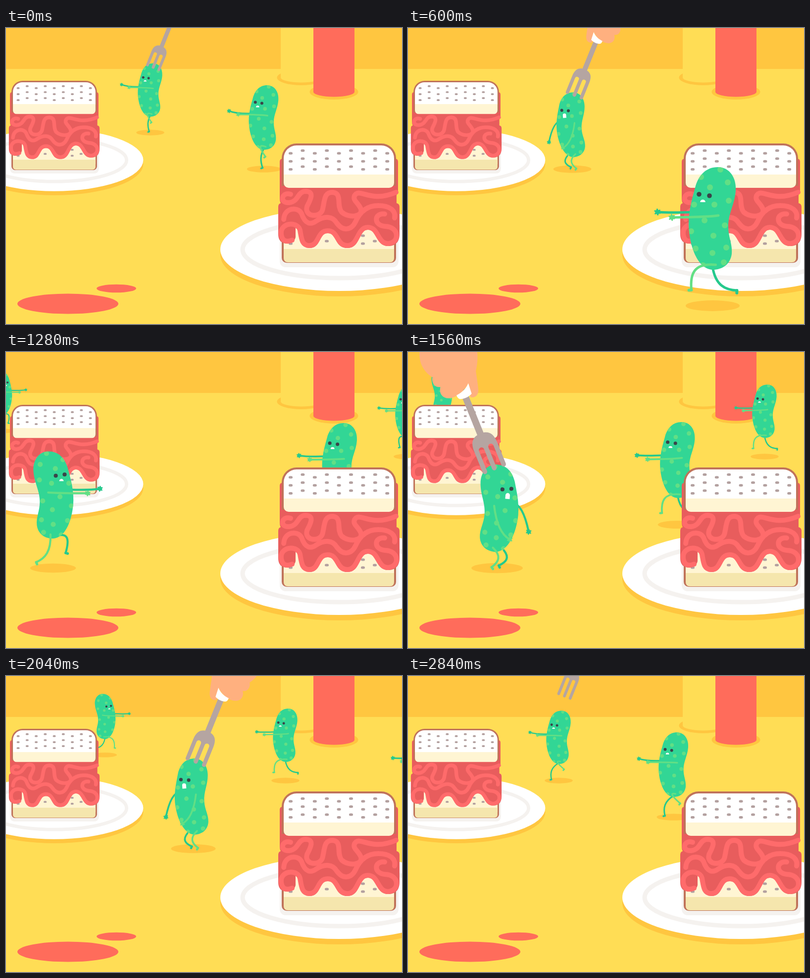
Write an HTML page with a canvas that moves like this. It is 800 by 600 pixels and loops after 2880 ms.

```html
<!DOCTYPE html>
<html lang="en">
<head>
<meta charset="utf-8">
<title>Pickle picnic</title>
<style>
html, body { margin: 0; width: 100%; height: 100%; overflow: hidden; background: #ffdd55; }
canvas { display: block; }
</style>
</head>
<body>
<canvas id="stage" width="800" height="600"></canvas>
<script>
const ctx = document.getElementById('stage').getContext('2d');
const LOOP = 2880, STEP = 40, CYCLE = 480, SPEED = 0.625;
const ORANGE = '#ffc640', TABLE = '#ffdd55', RED = '#ff6c5b', PLATE_GREY = '#f5f2ef';
const GREEN = '#32d695', DARK = '#25c98d', LIGHT = '#62df85';

const clamp = v => Math.max(0, Math.min(1, v));
const mix = (a, b, p) => a + (b - a) * p;
const mod = (a, n) => ((a % n) + n) % n;

function fill(path, color) { ctx.fillStyle = color; ctx.fill(path); }
function stroke(path, color, width) {
  ctx.strokeStyle = color;
  ctx.lineWidth = width;
  ctx.lineCap = ctx.lineJoin = 'round';
  ctx.stroke(path);
}
function ellipse(x, y, rx, ry, color) {
  const p = new Path2D();
  p.ellipse(x, y, rx, ry, 0, 0, 7);
  fill(p, color);
}
function rect(x, y, w, h, color, radii = 0) {
  const p = new Path2D();
  p.roundRect(x, y, w, h, radii);
  fill(p, color);
}
function group(draw) { ctx.save(); draw(); ctx.restore(); }

// ---------- table setting ----------
const meat = new Path2D('M553 271 Q553 265 559 265 H786 Q792 265 792 271 V331 Q789 335 789 340 ' +
  'V355 Q795 356 795 363 V418 C795 434 786 442 772 442 C746 442 751 409 731 409 ' +
  'C711 409 717 446 690 446 C662 446 670 416 650 416 C630 416 638 446 613 446 ' +
  'C592 446 597 405 585 402 V424 Q582 437 567 437 Q550 436 550 418 V363 Q550 356 555 355 Q553 352 553 345 Z');
const noodles = new Path2D(
  'M575 337 C556 331 552 356 572 354 C592 352 588 331 606 331 C626 332 612 353 608 362 ' +
  'C602 384 637 386 640 366 C644 347 643 333 660 333 C680 335 667 360 678 373 ' +
  'C692 386 722 383 717 367 C712 354 700 350 704 340 C714 322 735 356 788 333 ' +
  'M561 388 C563 363 590 362 597 376 C604 397 615 400 627 391 C645 380 660 382 668 395 ' +
  'C680 412 697 411 706 393 C715 372 730 360 752 360 C775 360 788 370 785 385 ' +
  'M578 430 C561 437 555 426 556 412 C560 393 590 393 594 410 C597 428 598 441 613 441 ' +
  'C633 441 628 411 650 411 C672 411 667 441 690 441 C712 441 709 404 731 404 ' +
  'C753 404 750 437 772 437 C796 435 795 403 766 402 C741 400 744 374 765 377');

function seed(x, y) { rect(x - 4, y - 2.5, 8, 5, '#b3a09f', 2.5); }

function sandwich() {
  ellipse(673, 460, 240, 84, ORANGE);
  ellipse(673, 449, 240, 84, '#fff');
  const ring = new Path2D();
  ring.ellipse(673, 449, 195, 58, 0, 0, 7);
  stroke(ring, PLATE_GREY, 9);
  rect(553, 400, 240, 85, PLATE_GREY, 12);

  rect(557, 380, 231, 96, '#c0735a', 10);
  rect(561, 380, 223, 80, '#fff5d3');
  rect(561, 448, 223, 27, '#f5e6ad', [0, 0, 8, 8]);
  for (const [x, y] of [[575, 437], [648, 432], [721, 421], [721, 437], [745, 432]]) seed(x, y);

  fill(meat, '#e85d5d');
  rect(557, 234, 231, 91, '#c0735a', [30, 30, 8, 8]);
  rect(556, 318, 233, 8, '#e85d5d');
  rect(557, 300, 231, 20, '#c0735a');
  rect(561, 238, 223, 60, '#fff', [26, 26, 0, 0]);
  rect(561, 297, 223, 27, '#fff5d3', [0, 0, 10, 10]);
  for (let col = 0; col < 9; col++)
    for (let row = 0; row < 3; row++)
      seed(575 + col * 24.4, (col % 2 ? 248.5 : 254) + row * 16.2);
  stroke(noodles, '#ff6b6b', 10);
}

function bottle(x, base, color) {
  ellipse(x, base, 49, 15.5, ORANGE);
  rect(x - 41.5, 0, 83, base, color);
  ellipse(x, base, 41.5, 10, color);
}

function table() {
  rect(0, 0, 800, 600, TABLE);
  rect(0, 0, 800, 83, ORANGE);
  bottle(596.5, 100.5, TABLE);
  bottle(662.5, 129.5, RED);
  ellipse(125, 559, 102, 20.5, RED);
  ellipse(223, 528, 40, 8.3, RED);
}

// ---------- pickles: unit scale, facing left, ground at y = 0 ----------
const body = new Path2D('M12 -208 C36 -208 50 -186 48 -160 C46 -132 33 -115 33 -88 ' +
  'C33 -65 42 -52 40 -32 C37 -10 20 0 2 0 C-30 -1 -46 -50 -47 -92 C-47 -125 -38 -150 -33 -170 C-26 -192 -12 -208 12 -208Z');
const spots = [[-22, -188], [17, -203], [32, -177], [-4, -167], [-36, -132], [5, -132], [34, -140], [-15, -100],
  [26, -90], [-42, -78], [3, -69], [-33, -43], [29, -45], [1, -34], [24, -15], [-18, -9]];

// Foot x, y and knee x, y at twelve even steps of the stride.
const stride = [[-4, -4, -16, -38], [21, -4, -2, -30], [40, -14, 4, -30], [49, -31, 8, -33],
  [38, -42, -6, -58], [21, -44, -20, -80], [5, -40, -26, -84], [-12, -38, -36, -88],
  [-30, -36, -46, -92], [-43, -32, -48, -88], [-46, -9, -46, -66], [-28, -4, -38, -46]];
const dangle = { dark: [-4, -6, -34, -20], light: [13, -2, -16, -24] };

function legPose(phase, rest, p) {
  const i = mod(phase, CYCLE) / 40, k = Math.floor(i);
  return stride[k].map((v, n) => mix(mix(v, stride[(k + 1) % 12][n], i - k), rest[n], p));
}

function leg(hx, hy, [fx, fy, kx, ky], color) {
  const cx = mix(fx, kx, 0.6), cy = mix(fy, ky, 0.6);
  const p = new Path2D();
  p.moveTo(hx, hy);
  p.bezierCurveTo(mix(hx, kx, 0.8), mix(hy, ky, 0.8), cx, cy, fx, fy);
  stroke(p, color, 5);
  const len = Math.hypot(fx - cx, fy - cy) || 1;
  const toe = new Path2D();
  toe.moveTo(fx, fy);
  toe.lineTo(fx - (fy - cy) / len * 5, fy + (fx - cx) / len * 5);
  stroke(toe, color, 6);
}

function arm(sx, sy, cx, cy, hx, hy, color) {
  const p = new Path2D();
  p.moveTo(sx, sy);
  p.quadraticCurveTo(cx, cy, hx, hy);
  stroke(p, color, 5);
  ellipse(hx, hy, 4.8, 4.8, color);
  const fingers = new Path2D();
  for (let a = 0.4; a < 6; a += Math.PI / 3) {
    fingers.moveTo(hx, hy);
    fingers.lineTo(hx + 5.6 * Math.cos(a), hy + 5.6 * Math.sin(a));
  }
  stroke(fingers, color, 3);
}

function pickle(phase, p, height) {
  const sway = 4 * Math.cos(4 * Math.PI * phase / CYCLE);
  const settle = clamp(p * 1.5);
  const darkHand = [mix(-110, -75, p * p), mix(-121 - sway, -48, 1 - (1 - p) ** 1.2)];
  const lightHand = [mix(-81, -30, p ** 1.5), mix(-110 - sway, -30, 1 - (1 - p) ** 2)];
  const shoulder = mix(13, 7, p);

  leg(mix(0, -16, settle), -height - 4, legPose(phase, dangle.dark, settle), DARK);
  group(() => {
    ctx.translate(mix(-1.5, 0, p), -height);
    arm(-36, -117, mix(-36, darkHand[0], 0.65), -115, ...darkHand, DARK);
    group(() => {
      ctx.translate(3.5 * settle, 0);
      ctx.rotate(-0.075 * settle);
      fill(body, GREEN);
      group(() => {
        ctx.clip(body);
        for (const [x, y] of spots) ellipse(x, y, 6, 6, LIGHT);
      });
      ellipse(-26, -153, 4.8, 4.8, '#3a4449');
      ellipse(-5, -150, 4.8, 4.8, '#3a4449');
      const mouth = new Path2D();
      mouth.arc(-18.5, -137, 5.3, Math.PI, 0);
      mouth.lineTo(-13.2, -137 + 9 * settle);
      mouth.lineTo(-23.8, -137 + 9 * settle);
      fill(mouth, '#fff');
    });
    arm(shoulder, -110, mix(shoulder, lightHand[0], 0.2), mix(-110, lightHand[1], 0.8), ...lightHand, LIGHT);
  });
  leg(mix(6, 10, settle), -height - 10, legPose(phase + CYCLE / 2, dangle.light, settle), LIGHT);
}

// ---------- fork and hand, authored around (390, 520) ----------
const fist = new Path2D('M590 -400 L470 -10 C437 12 438 55 445 85 C443 100 440 118 439 130 C439 145 449 150 458 147 ' +
  'L463 114 C474 134 490 148 508 150 C527 151 533 135 529 123 C544 126 551 110 548 100 ' +
  'C572 85 580 62 579 42 C578 22 572 8 562 -8 L690 -380Z');
const cuff = new Path2D('M463 114 L455 139 C462 147 473 152 483 152 Q488 151 491 143 C478 136 469 128 463 114Z');

function fork(tip) {
  group(() => {
    ctx.translate(9, -198);
    ctx.rotate(22 * Math.PI / 180);
    const tine = 'a5.5 5.5 0 0 1 -11 0';
    fill(new Path2D(`M-29.5 ${tip} V-60 C-29.5 -80 -23 -91 -8 -94 V-195 H8 V-94 C23 -91 29.5 -80 29.5 -60 ` +
      `V${tip} ${tine} V-57 A6.5 6.5 0 0 0 5.5 -57 V${tip} ${tine} V-57 A6.5 6.5 0 0 0 -18.5 -57 V${tip} ${tine}Z`), '#b5a5a1');
  });
  ctx.translate(-390, -520);
  fill(fist, '#ffb07f');
  fill(cuff, '#fff');
}

// ---------- one lane: walk in, get speared, get lifted away ----------
function lane(time, { x, y, s, caught, dir }) {
  const since = mod(time - caught + 2480, LOOP) - 2480;
  const phase = since < 0 ? mod(time, CYCLE) : 0;
  const p = clamp(since / 120);
  const walked = Math.min(since, 0) * SPEED;
  const height = since < 0
    ? 67.5 - 5.5 * Math.cos(4 * Math.PI * phase / CYCLE)
    : 38.5 + 23.5 * (1 - p) ** 1.5;

  group(() => {
    ctx.translate(x, y);
    ctx.scale(s * dir, s);

    const shade = mix(54.5, 61, p) * clamp(1 - (since - 130) / 160);
    if (shade > 0) ellipse(-walked, 0, shade, shade * 0.2, ORANGE);

    const q = (since - 120) / 200;
    if (q > 1) return;
    if (q > 0) {
      ctx.translate(120, -460 - 900 * q ** 1.6);
      ctx.rotate(50 * q * Math.PI / 180);
      ctx.translate(-120, 460);
    }
    group(() => {
      ctx.translate(-walked, 0);
      pickle(phase, p, height);
    });
    if (since > -260) {
      const k = Math.max(0, -since / STEP);
      const away = 98 * k * (1 + 0.07 * (k - 1));
      ctx.translate(0.42 * away - 4.5 * p * p, mix(-51, -35, p * p) - 0.9 * away);
      fork(since < 0 ? 8 : -6);
    }
  });
}

const lanes = [
  { x: 299, y: 160, s: 0.44, caught: 2400, dir: -1 },
  { x: 291.5, y: 212, s: 0.52, caught: 0, dir: 1 },
  { x: 332, y: 286, s: 0.63, caught: 480, dir: 1 },
  { x: 378.5, y: 350, s: 0.74, caught: 1920, dir: 1 },
  { x: 180, y: 438, s: 0.85, caught: 1440, dir: -1 },
  { x: 390.5, y: 563, s: 1, caught: 960, dir: 1 }
];

function draw(time) {
  table();
  lanes.slice(0, 2).forEach(l => lane(time, l));
  group(() => {
    ctx.translate(-405.6, -68);
    ctx.scale(0.748, 0.748);
    sandwich();
  });
  lanes.slice(2, 4).forEach(l => lane(time, l));
  sandwich();
  lanes.slice(4).forEach(l => lane(time, l));
}

const start = performance.now();
function tick() {
  const time = (performance.now() - start) % LOOP;
  draw(Math.floor(time / STEP) * STEP);
  requestAnimationFrame(tick);
}
tick();
</script>
</body>
</html>
```
